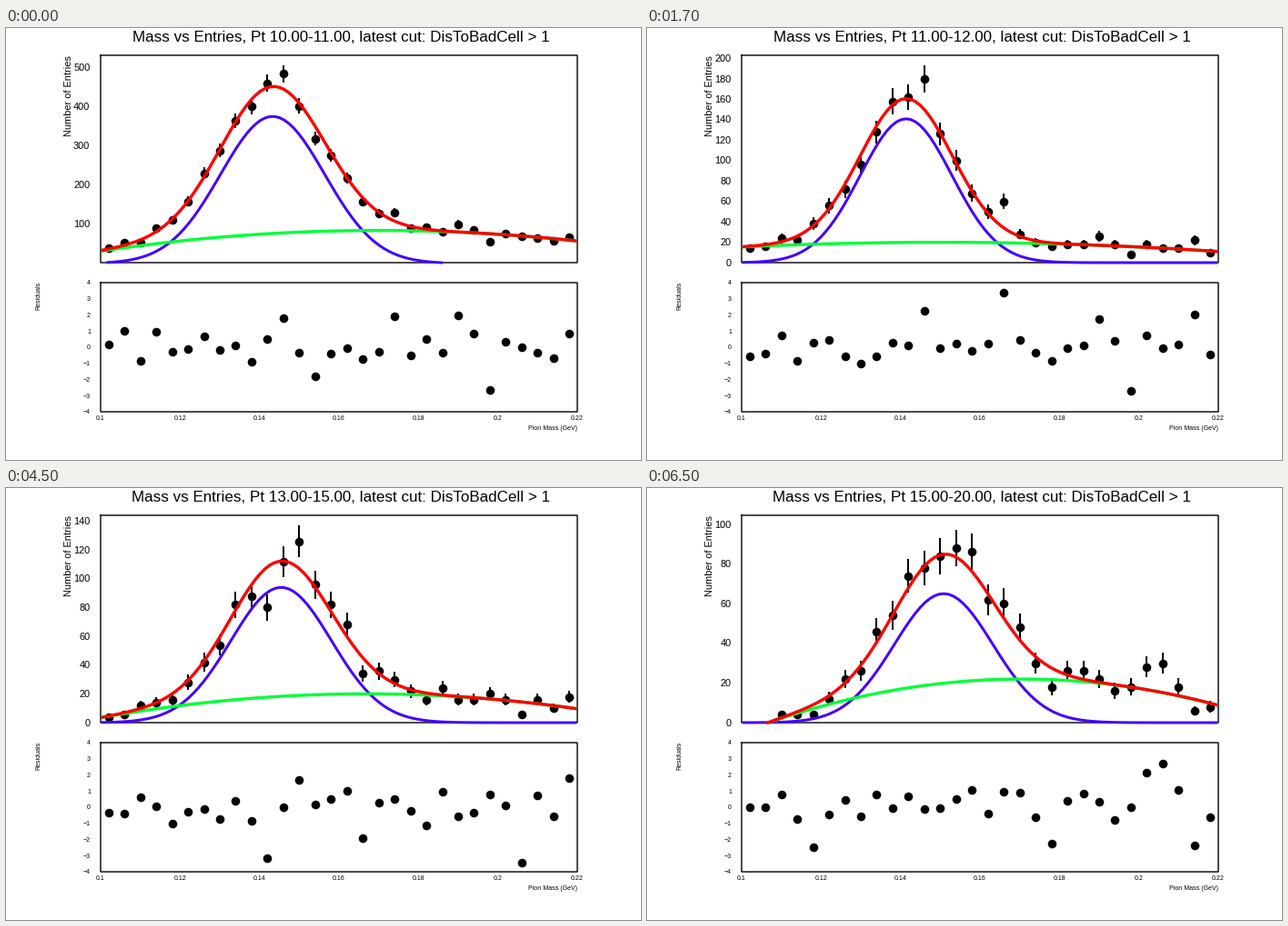
Recreate the animation shown at these times as a matplotlib script. Size 698 by 475 pixels, loop 8000 ms.

```python
import numpy as np
import matplotlib.pyplot as plt
from matplotlib.animation import FuncAnimation

W, H, DPI = 698, 475, 100
LEFT, RIGHT = 104, 628
TOP, BOTTOM = 30, 258            # upper panel
RES_TOP, RES_BOTTOM = 280, 422   # residual panel
STEP_MS, LOOP_MS = 500, 8000
STARTS = [0, 500, 2500, 4500, 6500]

plt.rcParams["font.family"] = "Liberation Sans"

BIN_X = 0.102 + 0.004 * np.arange(30)
CURVE_X = 0.1006 + 0.0012 * np.arange(100)


def px(size):
    return size * 72 / DPI


def mass_to_x(mass):
    return LEFT + (mass - 0.1) / 0.12 * (RIGHT - LEFT)


def residual_to_y(r):
    return (RES_TOP + RES_BOTTOM) / 2 - r * (RES_BOTTOM - RES_TOP) / 8


def sample_counts(fit, seed, outliers):
    """Even counts scattered around the fit, with a few marked outliers."""
    r = np.random.default_rng(seed).uniform(-1, 1, len(fit))
    for i, value in outliers.items():
        r[i] = value
    # r = (n - fit) / sqrt(n), solved for n
    root = (r + np.sqrt(r * r + 4 * fit)) / 2
    return np.where(fit > 0, 2 * np.round(root ** 2 / 2), 0)


class Slice:
    """One momentum range: Gaussian peak on a parabolic background."""

    def __init__(self, pt, peak, parabola, y_range, tick,
                 seed=0, outliers=None, counts=None):
        self.title = f"Mass vs Entries, Pt {pt}, latest cut: DisToBadCell > 1"
        self.peak, self.parabola = peak, parabola
        self.low, self.high = y_range
        self.tick = tick
        fit = np.maximum(self.total(BIN_X), 0)
        self.counts = (sample_counts(fit, seed, outliers)
                       if counts is None else counts)
        self.errors = np.sqrt(self.counts)
        self.residuals = (self.counts - fit) / np.maximum(self.errors, 1)

    def signal(self, x):
        height, mean, sigma = self.peak
        return height * np.exp(-0.5 * ((x - mean) / sigma) ** 2)

    def background(self, x):
        height, center, bend = self.parabola
        return height - bend * (x - center) ** 2

    def total(self, x):
        return self.signal(x) + self.background(x)

    def to_y(self, n):
        return BOTTOM - (n - self.low) / (self.high - self.low) * (BOTTOM - TOP)

    def curve_y(self, func):
        n = func(CURVE_X)
        return np.where(n >= self.low, self.to_y(n), np.nan)

    def ticks(self):
        first = int(np.ceil(self.low / self.tick)) * self.tick
        return range(first, int(self.high) + 1, self.tick)


first = Slice("10.00-11.00", (375, 0.1433, 0.0131), (84, 0.17, 10750),
              (1.9, 531), 100, seed=1,
              outliers={11: 1.75, 13: -1.8, 18: 1.86, 22: 2.03, 24: -2.53})
slices = [
    first,
    Slice("11.00-12.00", (140.8, 0.1414, 0.01155), (19.9, 0.15, 1833),
          (0, 203), 20, seed=2,
          outliers={11: 2.25, 16: 3.38, 22: 1.8, 24: -2.65, 28: 2.08}),
    Slice("12.00-13.00", (377, 0.1434, 0.0132), (82, 0.171, 10270),
          (1.9, 531), 100, counts=first.counts),
    Slice("13.00-15.00", (94, 0.14545, 0.01265), (20, 0.167, 3700),
          (0, 144.1), 20, seed=3,
          outliers={10: -3.15, 12: 1.75, 16: -1.92, 26: -3.44, 29: 1.8}),
    Slice("15.00-20.00", (65, 0.15085, 0.0124), (21.95, 0.1705, 5400),
          (0, 104.5), 20, seed=4,
          outliers={4: -2.42, 19: -2.25, 25: 2.2, 26: 2.76, 28: -2.31}),
]

fig = plt.figure(figsize=(W / 100, H / 100), dpi=DPI, facecolor="white")
ax = fig.add_axes([0, 0, 1, 1])
ax.set_xlim(0, W)
ax.set_ylim(H, 0)
ax.axis("off")


def label(x, y, text, size, ha="center", **kw):
    return ax.text(x, y, text, fontsize=px(size), ha=ha, va="baseline",
                   color="black", **kw)


def box(top, bottom):
    ax.plot([LEFT, RIGHT, RIGHT, LEFT, LEFT], [top, top, bottom, bottom, top],
            color="black", lw=px(1.4), solid_joinstyle="miter", snap=False,
            zorder=1)


def dots():
    return ax.plot([], [], "o", color="black", ms=px(9.6), mew=0,
                   snap=False, zorder=3)[0]


def curve(color, width, zorder):
    return ax.plot([], [], color=color, lw=px(width), zorder=zorder,
                   solid_capstyle="projecting", solid_joinstyle="round")[0]


box(TOP, BOTTOM)
box(RES_TOP, RES_BOTTOM)
for r in range(-4, 5):
    label(93, residual_to_y(r) + 2.3, str(r).replace("-", "\u2212"), 7, "right")
for i in range(7):
    mass = 0.1 + 0.02 * i
    label(mass_to_x(mass), 431, f"{mass:.3g}", 7)
label(RIGHT + 0.5, 442, "Pion Mass (GeV)", 7, "right")
vertical = dict(ha="right", rotation=90, rotation_mode="anchor")
label(71.5, 30.5, "Number of Entries", 11, **vertical)
label(37.5, 278.5, "Residuals", 7, **vertical)

title = label(368.3, 15.2, "", 17)
tick_labels = [label(92.5, 0, "", 11, "right") for _ in range(12)]
bars = ax.vlines([], [], [], color="black", lw=px(2), zorder=2)
points, residual_points = dots(), dots()
signal_line = curve("#4600ff", 3, 4)
background_line = curve("#00ff37", 3.4, 5)
total_line = curve("#ff0000", 3.4, 6)
curve_x, bin_x = mass_to_x(CURVE_X), mass_to_x(BIN_X)


def draw(i):
    now = i * STEP_MS
    s = slices[sum(start <= now for start in STARTS) - 1]
    title.set_text(s.title)
    for text in tick_labels:
        text.set_text("")
    for text, n in zip(tick_labels, s.ticks()):
        text.set_text(str(n))
        text.set_y(s.to_y(n) + 3.7)

    seen = s.counts > 0
    x, n, err = bin_x[seen], s.counts[seen], s.errors[seen]
    points.set_data(x, s.to_y(n))
    bars.set_segments([[(a, lo), (a, hi)] for a, lo, hi
                       in zip(x, s.to_y(n - err), s.to_y(n + err))])
    residual_points.set_data(bin_x, residual_to_y(s.residuals))

    signal_line.set_data(curve_x, s.curve_y(s.signal))
    background_line.set_data(curve_x, s.curve_y(s.background))
    total_line.set_data(curve_x, s.curve_y(s.total))
    return []


anim = FuncAnimation(fig, draw, frames=LOOP_MS // STEP_MS, interval=STEP_MS,
                     init_func=lambda: draw(0), repeat=True, repeat_delay=0,
                     blit=False)
plt.show()
```
